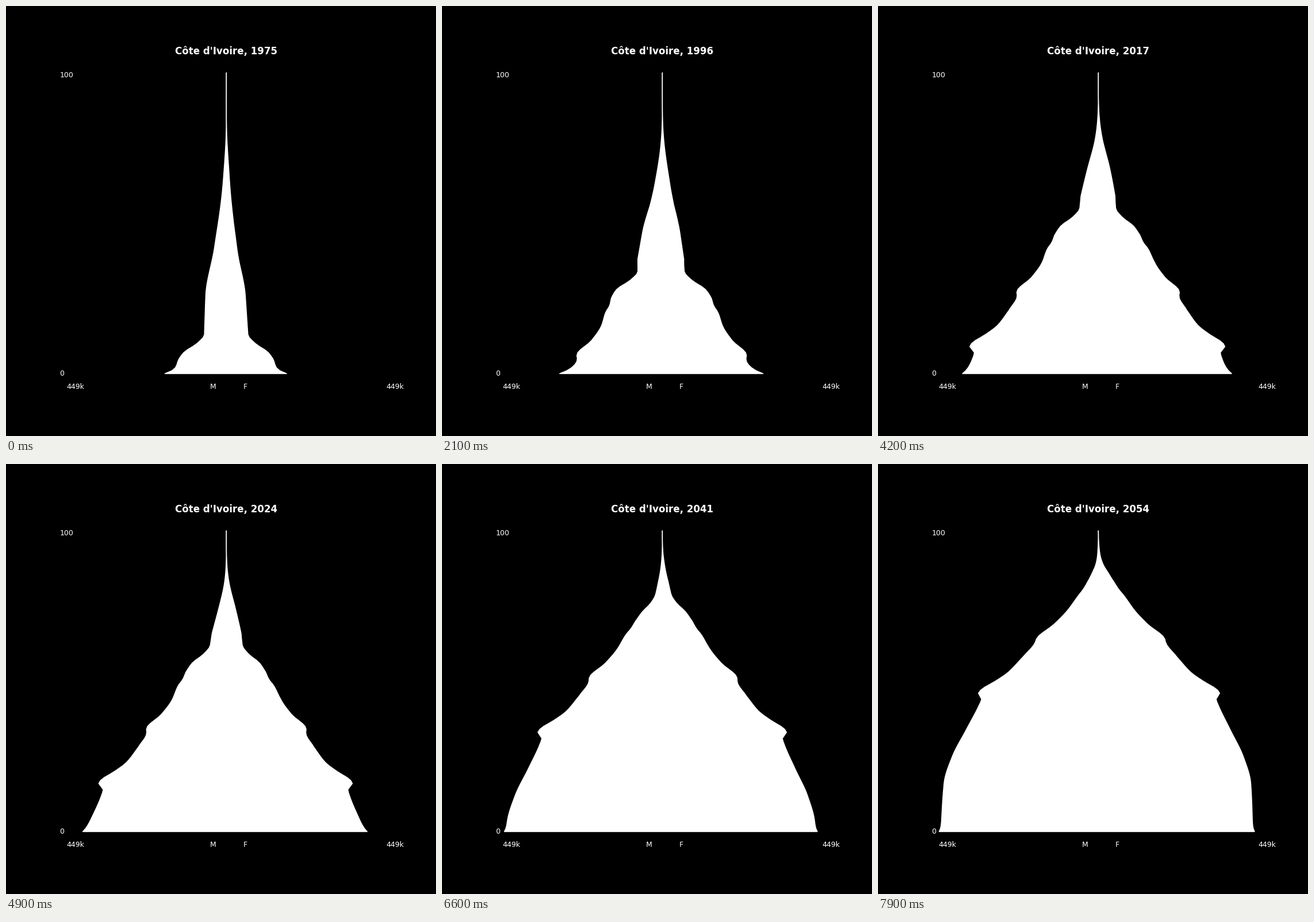
These frames come from a looping animation (748x748 px, 8000 ms). A matplotlib script:

```python
import numpy as np
import matplotlib.pyplot as plt
from matplotlib.animation import FuncAnimation

SIZE, DPI = 748, 100
START, FRAMES = 1975, 80
AGES = np.arange(101)
HALF_SPAN = 0.775 * SIZE / 2  # one data unit is one pixel across

# cohort size after infancy, at the bends of the birth curve
COHORTS = np.array([
    (1910, 14), (1933, 26.5), (1949, 40.5), (1962, 40.4), (1965, 53.6),
    (1968, 76.4), (1971, 85.2), (1973, 85.8), (1976, 92.3), (1980, 98.8),
    (1985, 117), (1990, 144), (1991, 143.7), (1996, 161), (2001, 179.3),
    (2004, 199.5), (2007, 222.9), (2008, 225.5), (2010, 217), (2012, 219.5),
    (2020, 236.3), (2029, 257.5), (2038, 270), (2054, 273)], float).T


def ramp(x, start, end):
    return np.clip((x - start) / (end - start), 0, 1)


def smooth(q, x, y):
    """Shape-preserving cubic through the points (x, y)."""
    h = np.diff(x)
    d = np.diff(y) / h
    a, b = d[:-1], d[1:]
    m = np.zeros_like(y)
    same = a * b > 0
    m[1:-1][same] = 2 * a[same] * b[same] / (a + b)[same]
    q = np.clip(q, x[0], x[-1])
    i = np.clip(np.searchsorted(x, q) - 1, 0, len(h) - 1)
    t = (q - x[i]) / h[i]
    return ((1 + 2 * t) * (1 - t) ** 2 * y[i] + t * (1 - t) ** 2 * h[i] * m[i]
            + t * t * (3 - 2 * t) * y[i + 1] + t * t * (t - 1) * h[i] * m[i + 1])


def infancy(age, born):
    """Excess of the first years of life, shrinking over the decades."""
    share = np.clip(0.19 - 0.0038 * (born - 1975), 0.015, 0.19)
    return 1 + share * np.exp(-age / 1.3)


def survival(age, born):
    """Steady loss plus a Gompertz term, both milder for later cohorts."""
    steady = 0.004 * np.minimum(1, np.exp((1970 - born) / 24))
    ageing = 0.0027 * np.exp(-0.0142 * (born - 1940))
    return np.exp(-steady * age - ageing * (np.exp(0.08 * age) - 1))


def migration(year, born):
    """Arrivals until 1996, then some departures of the older cohorts."""
    gain = 0.25 * ramp(born, 1940, 1958) - 0.10 * ramp(born, 1958, 1970)
    stay = np.clip(min(year, 1996) - np.maximum(born, 1975), 0, 21) / 21
    loss = 0.07 * ramp(year, 1996, 2004) * (1 - ramp(born, 1960, 1975))
    return np.exp(gain * stay - loss)


def sex_ratio(age, born):
    """Women per man: fewer at birth and among migrants, more in old age."""
    natural = -0.02 + 0.0004 * age + 0.0002 * np.exp(0.09 * age)
    migrants = (ramp(age, 12, 37) * (1 - ramp(age, 50, 75))
                * (1 - ramp(born, 1960, 1980)))
    return np.exp(np.minimum(natural, 0.7) - 0.14 * migrants)


def pyramid(year):
    born = year - AGES
    men = (smooth(born, *COHORTS) * infancy(AGES, born)
           * survival(AGES, born) * migration(year, born))
    return men, men * sex_ratio(AGES, born)


plt.rcParams["font.family"] = "DejaVu Sans"
fig = plt.figure(figsize=(SIZE / DPI, SIZE / DPI), dpi=DPI, facecolor="black")
ax = fig.add_axes([0.125, 0.11, 0.775, 0.77])
ax.set(xlim=(-HALF_SPAN, HALF_SPAN), ylim=(-5, 105))
ax.axis("off")


def label(x, y, text, **style):
    return ax.text(x, y, text, transform=ax.transAxes, color="white", **style)


title = label(0.5, 1.01, "", size=12, weight="bold", ha="center")
for x, y, text in [(0, 0.94, "100"), (0, 0.04, "0"), (0.02, 0, "449k"),
                   (0.98, 0, "449k"), (0.45, 0, "M"), (0.55, 0, "F")]:
    label(x, y, text, size=9)

shape, = ax.fill([0, 0, 0], [0, 0, 0], facecolor="white", edgecolor="white",
                 lw=1, joinstyle="round")
rows = np.concatenate([AGES, AGES[::-1]])


def draw(frame):
    year = START + frame
    men, women = pyramid(year)
    shape.set_xy(np.column_stack([np.concatenate([-men, women[::-1]]), rows]))
    title.set_text(f"Côte d'Ivoire, {year}")
    return shape, title


anim = FuncAnimation(fig, draw, frames=FRAMES, interval=100,
                     repeat=True, repeat_delay=0)
plt.show()
```
